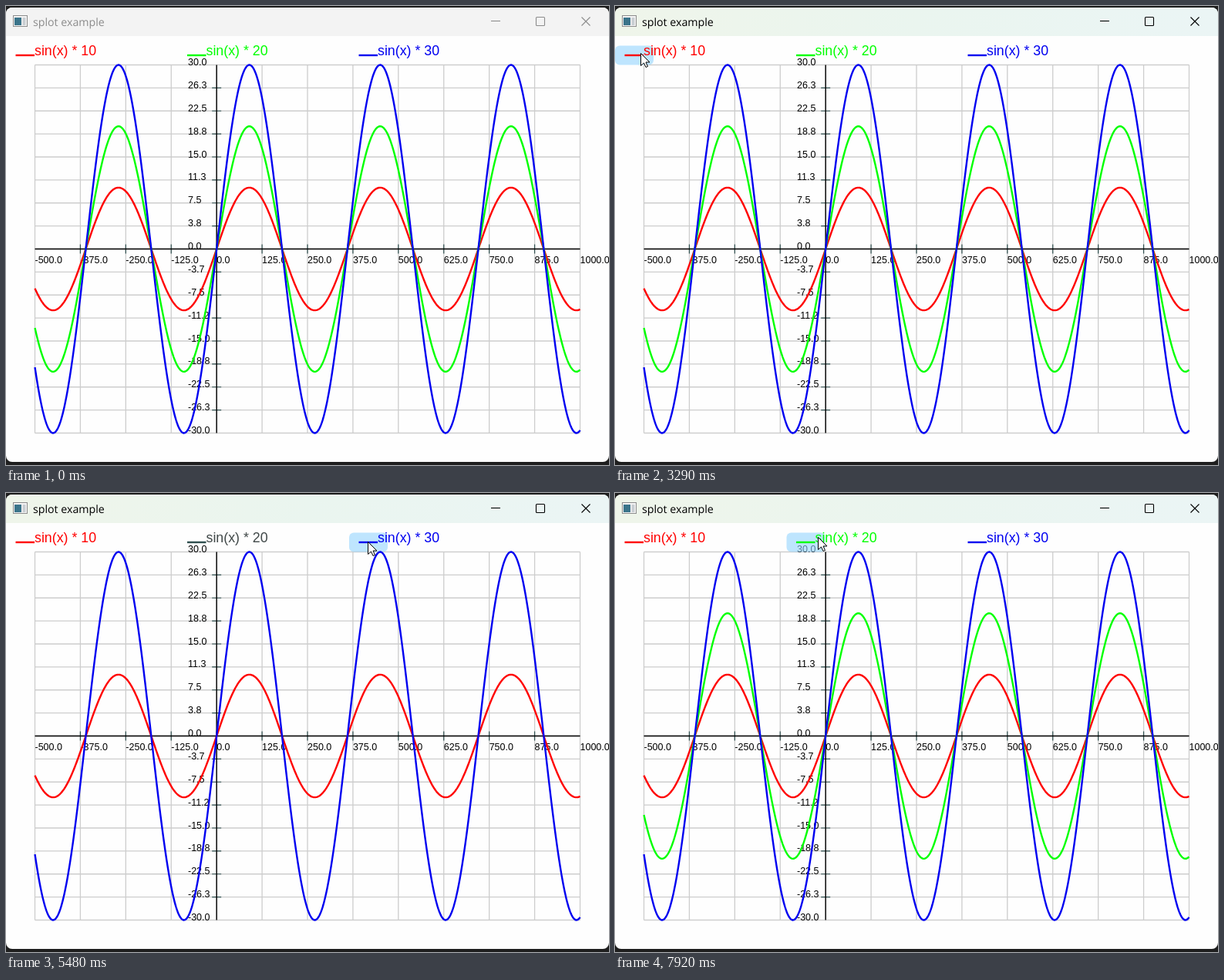
An HTML page for the animation above (7.99 s loop, 782x596 px).

```html
<!DOCTYPE html>
<html lang="en">
<head>
<meta charset="utf-8">
<title>splot example</title>
<style>
html, body { margin: 0; width: 100%; height: 100%; overflow: hidden; background: #1e1e1e; }
svg { display: block; }
.label { font: 12.5px "Liberation Sans", Arial, sans-serif; }
.legend { font: 17.8px "Liberation Sans", Arial, sans-serif; }
.title { font: 14.2px "Open Sans", sans-serif; text-rendering: geometricPrecision; }
</style>
</head>
<body>
<svg width="782" height="596" viewBox="0 0 782 596">
  <defs>
    <linearGradient id="bar">
      <stop offset="0" stop-color="#eff5ea"/>
      <stop offset=".5" stop-color="#eaf5ef"/>
      <stop offset="1" stop-color="#ebf5f5"/>
    </linearGradient>
    <clipPath id="frame"><rect y="2" width="782" height="590" rx="8"/></clipPath>
  </defs>
  <rect width="782" height="596" fill="#1e1e1e"/>
  <g clip-path="url(#frame)">
    <rect width="782" height="596" fill="#fefefe"/>
    <rect id="titleBar" width="782" height="39"/>
  </g>
  <g id="icon">
    <rect x="9.5" y="12.5" width="18" height="14" fill="#f4f4f4" stroke="#8c8c8c"/>
    <rect x="11" y="15" width="9" height="10" fill="#3a748a"/>
    <rect x="21.5" y="15" width="4" height="10" fill="#c9ced2"/>
  </g>
  <text id="titleText" class="title" x="35" y="25.6">splot example</text>
  <g id="buttons" fill="none" stroke-width="1.1">
    <path d="M629 19.5h12"/>
    <rect x="687.5" y="14.5" width="11" height="11" rx="1"/>
    <path d="M746.5 14.5l11 11m0-11l-11 11"/>
  </g>
  <g id="plot"></g>
  <rect id="hover" y="51.5" width="50" height="25" rx="6" fill="rgb(149,213,255)" fill-opacity=".6"/>
  <g id="curves" fill="none" stroke-width="2.4" stroke-linejoin="round"></g>
  <g id="legends"></g>
  <path id="cursor" fill="#fff" stroke="#000" stroke-linejoin="round"
    d="M.5 .5v16l4-3.500 2.500 5.500 2.500-1-2.500-5.500h5z"/>
</svg>
<script>
const LOOP = 7990, STEP = 66.7, ENTER = 280, ACTIVATE = 2300;
const LEFT = 37.5, TOP = 76.5, W = 707, H = 478, COLS = 12, ROWS = 16;
const X0 = LEFT + W / 3, Y0 = TOP + H / 2;
const OFF = '#2f4f4f', DIM = '#8c8c8c';
const $ = id => document.getElementById(id);

function add(parent, tag, attrs, text) {
  const el = document.createElementNS('http://www.w3.org/2000/svg', tag);
  for (const k in attrs) el.setAttribute(k, attrs[k]);
  if (text) el.textContent = text;
  return parent.appendChild(el);
}

function show(el, on) {
  el.style.display = on ? '' : 'none';
}

// off, on: when a click hides the curve and brings it back
const series = [
  { color: '#ff0000', off: 2430, on: 3160 },
  { color: '#00ff00', off: 4170, on: 7500 },
  { color: '#0000f0', off: 5750, on: 6560 }
];

// Each move eases from the previous place to x, y
const moves = [
  { start: 280, end: 1080, x: 97, y: 53 },
  { start: 1080, end: 1600, x: 33, y: 61 },
  { start: 3480, end: 4000, x: 254, y: 62 },
  { start: 4820, end: 5200, x: 469, y: 63 },
  { start: 6950, end: 7400, x: 254, y: 62 },
  { start: 7550, end: 7870, x: 263, y: 57 }
];

function pointer(t) {
  const u = ENTER + STEP * Math.floor((t - ENTER) / STEP);
  let x = 724, y = 588, lift = 0;
  for (const m of moves) {
    if (u < m.start) break;
    const p = Math.min(1, (u - m.start) / (m.end - m.start));
    const f = 1 - (1 - p) ** 2;
    x += (m.x - x) * f;
    y += (m.y - y) * f;
    lift = 12 * Math.sin(Math.PI * f);
  }
  return [x, y - lift];
}

function buildPlot() {
  const plot = $('plot');
  const colX = i => LEFT + W * i / COLS, rowY = i => TOP + H * i / ROWS;
  const label = (x, y, v) =>
    add(plot, 'text', { class: 'label', x, y: Math.round(y) }, v.toFixed(1));
  let grid = '', ticks = '';
  for (let i = 0; i <= COLS; i++) {
    grid += `M${colX(i)} ${TOP}v${H}`;
    if (i % COLS) ticks += `M${colX(i)} ${Y0 - 6}v12`;
  }
  for (let i = 0; i <= ROWS; i++) {
    grid += `M${LEFT} ${rowY(i)}h${W}`;
    if (i % ROWS) ticks += `M${X0 - 6} ${rowY(i)}h12`;
  }
  add(plot, 'path', { d: grid, stroke: '#cdcdcd', 'stroke-width': 1.3 });
  add(plot, 'path', { d: ticks, stroke: OFF, 'stroke-width': 1.2 });
  add(plot, 'path', {
    d: `M${LEFT} ${Y0}h${W}M${X0} ${TOP}v${H}`, stroke: '#000', 'stroke-width': 1.4
  });
  for (let i = 0; i <= COLS; i++) label(colX(i), 334, -500 + 125 * i);
  for (let i = 0; i <= ROWS; i++) {
    const v = 30 - 3.75 * i;
    // rounding drift of the axis values between 0 and -15
    label(236, rowY(i) + 0.5, v < 0 && v > -15 ? v + 0.01 : v);
  }
}

function buildSeries(s, i) {
  const pts = [];
  for (let px = 0; px <= W; px++) {
    const a = (-500 + 1500 * px / W) * Math.PI / 180;
    pts.push(`${LEFT + px},${(Y0 - (i + 1) * H / 6 * Math.sin(a)).toFixed(2)}`);
  }
  s.x = 12.5 + 222.5 * i;
  s.curve = add($('curves'), 'polyline', { points: pts.join(' '), stroke: s.color });
  s.line = add($('legends'), 'path', { d: `M${s.x} 64h24.500`, 'stroke-width': 2.4 });
  s.text = add($('legends'), 'text', { class: 'legend', x: s.x + 24.5, y: 64 }, `sin(x) * ${10 * (i + 1)}`);
}

function render(t) {
  const active = t >= ACTIVATE, ink = active ? '#000' : DIM;
  $('titleBar').setAttribute('fill', active ? 'url(#bar)' : '#f3f3f3');
  $('titleText').setAttribute('fill', ink);
  $('buttons').setAttribute('stroke', ink);

  const [x, y] = pointer(t);
  $('cursor').setAttribute('transform', `translate(${x.toFixed(1)} ${y.toFixed(1)})`);
  show($('cursor'), t >= ENTER);

  const hit = series.find(s => Math.abs(x - s.x - 12.5) <= 25 && y > 45 && y < 77);
  show($('hover'), hit);
  if (hit) $('hover').setAttribute('x', hit.x - 12.5);

  for (const s of series) {
    const on = t < s.off || t >= s.on;
    show(s.curve, on);
    s.line.setAttribute('stroke', on ? s.color : OFF);
    s.text.setAttribute('fill', on ? s.color : '#404848');
  }
}

buildPlot();
series.forEach(buildSeries);
const start = performance.now();
function tick() {
  render((performance.now() - start) % LOOP);
  requestAnimationFrame(tick);
}
tick();
</script>
</body>
</html>
```
